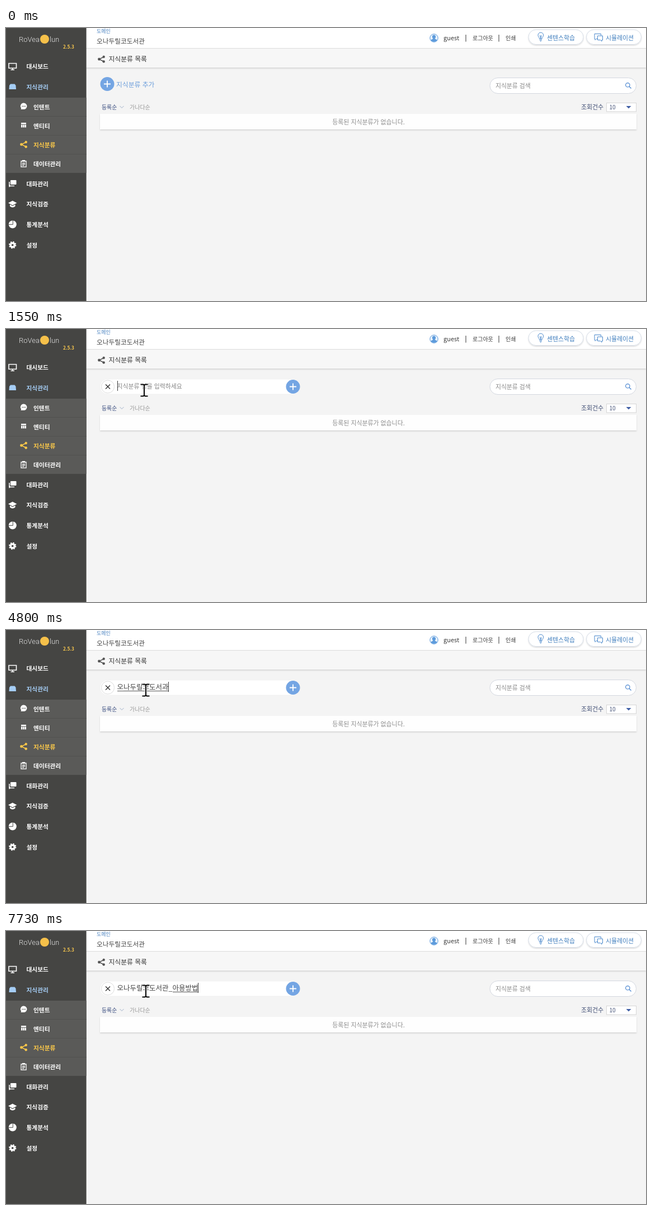
An HTML page for the animation above (8 s loop, 1144x490 px).

```html
<!DOCTYPE html>
<html lang="ko">
<head>
<meta charset="utf-8">
<title>지식분류 목록</title>
<style>
html, body { margin: 0; width: 100%; height: 100%; overflow: hidden; background: #f4f4f4; }
svg { display: block; width: 1144px; height: 490px; }
text { font-family: "Noto Sans CJK KR", "Noto Sans KR", "Noto Sans CJK JP", "Noto Sans CJK", sans-serif; white-space: pre; }
.brand { font: 300 13px Roboto, sans-serif; fill: #e4e4e4; }
.nav { font-size: 10.7px; font-weight: 700; fill: #fff; }
.lines { fill: none; stroke: currentColor; }
</style>
</head>
<body>
<svg viewBox="0 0 1144 490" xmlns="http://www.w3.org/2000/svg">
<defs>
  <filter id="shade" x="-10%" y="-30%" width="120%" height="180%">
    <feDropShadow dx="0" dy="1.5" stdDeviation="1.3" flood-color="#000" flood-opacity=".15"/>
  </filter>
  <g id="share" fill="currentColor">
    <path d="M5-4.5L-4 0L5 4.5" fill="none" stroke="currentColor" stroke-width="1.5"/>
    <circle cx="-4" r="2.4"/><circle cx="4.2" cy="-4.3" r="2.2"/><circle cx="4.2" cy="4.3" r="2.2"/>
  </g>
  <g id="plus">
    <circle r="12.5" fill="#74a5e3"/>
    <path d="M-6 0H6M0-6V6" stroke="#fff" stroke-width="1.8"/>
  </g>
  <path id="ibeam" d="M-6.5-10.5H-1.5L0-9L1.5-10.5H6.5M0-9.5V9.5M-6.5 10.5H-1.5L0 9L1.5 10.5H6.5"/>
  <clipPath id="fieldClip"><rect id="clipBox" x="168" y="88" height="32"/></clipPath>
</defs>

<rect width="1144" height="490" fill="#f4f4f4"/>
<rect x="143" y="37" width="1001" height="34" fill="#f7f7f7" filter="url(#shade)"/>
<rect x="143" width="1001" height="36" fill="#fff"/>
<path d="M143 36.5H1144" stroke="#dcdcdc"/>

<!-- sidebar -->
<rect width="143.6" height="490" fill="#454543"/>
<rect y="125" width="143.6" height="135" fill="#5a5a58"/>
<path d="M0 158.5H143.6M0 192.5H143.6M0 226.5H143.6" stroke="#51514f"/>
<text class="brand" x="23" y="24.5">RoVea</text>
<circle cx="69" cy="20" r="8" fill="#f5c04a"/>
<text class="brand" x="78" y="24.5">lun</text>
<text x="102" y="37" font-size="8.2" font-weight="700" fill="#fbc94d">2.5.3</text>
<g id="menu"></g>

<g color="#fff" fill="#fff">
  <path class="lines" d="M5 63.5H18.5V72H5ZM11.7 72V75M8.5 75H15" stroke-width="1.6"/>
  <path d="M6 103L8 100.5H15.5L17.5 103L18 110H5.5Z" fill="#a5cdf5"/>
  <path d="M31.5 134.5a6 5.8 0 1 1 0 11.6H26.5L27.3 144A6 5.8 0 0 1 31.5 134.5Z"/>
  <path d="M28.3 140.5h1.6m1 0h1.6m1 0h1.6" stroke="#5a5a58" stroke-width="1.5"/>
  <path d="M27 170h9v2.6h-9zM27 173.6h2.5v5h-2.5zM30.3 173.6h2.5v5h-2.5zM33.5 173.6h2.5v5h-2.5z"/>
  <use href="#share" x="31.5" y="209" color="#fcc84a"/>
  <path class="lines" d="M27 239H36V249.3H27ZM29 242.3H34M29 244.5H34M29 246.8H32.5" stroke-width="1.3"/>
  <path d="M29 237h5v2.5h-5z"/>
  <path d="M9 273h8.5q1 0 1 1v6q0 1-1 1h-8.5q-1 0-1-1v-6q0-1 1-1z"/>
  <path class="lines" d="M6 276V283.5H15" stroke-width="1.6"/><path d="M5.5 281v5l3-2.5z"/>
  <path d="M4 314L11.7 310L19.4 314L11.7 318.2ZM7 316.8L11.7 319.4L16.5 316.8V320Q11.7 324 7 320Z"/>
  <circle cx="11.8" cy="352.5" r="7"/>
  <path d="M12.3 345V352.7H5" fill="none" stroke="#454543"/>
  <circle cx="11.7" cy="389.5" r="3.6" fill="none" stroke="#fff" stroke-width="3.5"/>
  <circle cx="11.7" cy="389.5" r="5.7" fill="none" stroke="#fff" stroke-width="2" stroke-dasharray="2.24"/>
</g>

<!-- header -->
<text x="162" y="9" font-size="9" fill="#4a83c0">도메인</text>
<text x="162" y="28" font-size="11.7" fill="#444">오나두릴코도서관</text>
<circle cx="765" cy="18" r="7.2" fill="#eaf3fc" stroke="#5d9bdc"/>
<path d="M765 12.5c4.2 0 3.6 5 1.7 6.5c.2 1.2 3.3 1 3.8 3a7 7 0 0 1-11 0c.5-2 3.6-1.8 3.8-3c-1.9-1.5-2.5-6.5 1.7-6.5z" fill="#5d9bdc"/>
<g font-size="10" fill="#3c3c3c">
  <text x="782" y="21.5" font-size="11">guest</text>
  <text x="834" y="21.5">로그아웃</text>
  <text x="893" y="21.5">인쇄</text>
</g>
<path d="M822 12V24.5M881 12V24.5" stroke="#555" stroke-width="1.2"/>
<g fill="#fff" stroke="#d5dce6" filter="url(#shade)">
  <rect x="934" y="3" width="98" height="26.5" rx="13.25"/>
  <rect x="1037.5" y="3" width="98" height="26.5" rx="13.25"/>
</g>
<g class="lines" color="#4a88cc">
  <path d="M953.5 19.5C953.5 16.5 951 16 951 12.8a4.8 4.8 0 0 1 9.6 0C960.6 16 958 16.5 958 19.5ZM953.5 21.5H958M954.5 23.5H957M954.5 13L955.8 19L957 13"/>
  <path d="M1057 19.5H1055L1053 21.5V19.5H1052V10.5H1063.5V13.5M1057.5 14H1066.5V21.5H1065V24L1062.5 21.5H1057.5Z"/>
</g>
<g font-size="10.9" font-weight="500" fill="#3d7cbd">
  <text x="967" y="21.5">센텐스학습</text>
  <text x="1072" y="21.5">시뮬레이션</text>
</g>
<use href="#share" x="170.5" y="56" color="#555"/>
<text x="183.5" y="60" font-size="11.8" fill="#333">지식분류 목록</text>

<!-- list -->
<rect x="865" y="89.5" width="261.5" height="28" rx="14" fill="#fff" stroke="#d3d7df"/>
<text x="875" y="107.5" font-size="10.8" fill="#888">지식분류 검색</text>
<g class="lines" color="#4a86d0" stroke-width="1.2"><circle cx="1111.3" cy="102.3" r="3.7"/><path d="M1114 105L1117.5 108.5"/></g>
<text x="171" y="145.5" font-size="9.9" fill="#34487c">등록순</text>
<path class="lines" d="M203.5 140L207 143.5L210.5 140" color="#9dafc8"/>
<text x="221" y="145.5" font-size="10" fill="#999">가나다순</text>
<text x="1028" y="146" font-size="10.9" fill="#3f4d73">조회건수</text>
<rect x="1073.5" y="134.5" width="53" height="15.5" fill="#fff" stroke="#d6d6d6"/>
<text x="1078.5" y="146" font-size="10" fill="#3f4d73">10</text>
<path d="M1108.5 140H1117.5L1113 144.5Z" fill="#405fa5"/>
<rect x="168" y="154" width="959" height="28" fill="#fefefe" filter="url(#shade)"/>
<text x="648" y="172.5" font-size="10.9" fill="#8c8c8c" text-anchor="middle">등록된 지식분류가 없습니다.</text>

<!-- input -->
<rect id="field" x="168" y="90" height="27" rx="13.5" fill="#fff" stroke="#eee" stroke-width=".7"/>
<text id="hint" x="198.5" y="107" font-size="10.9" fill="#858585" clip-path="url(#fieldClip)">지식분류 명을 입력하세요</text>
<g id="close" transform="translate(182 103.5)">
  <circle r="11.5" fill="#fff" stroke="#dcdcdc"/>
  <path d="M-4-4L4 4M4-4L-4 4" stroke="#333" stroke-width="1.4"/>
</g>
<use id="add" href="#plus"/>
<text id="label" font-size="11.8" fill="#6c9edb">지식분류 추가</text>
<text id="typed" x="198.5" y="106.5" font-size="12.5" fill="#444"></text>
<path id="under" stroke="#555"/>
<path id="caret" stroke="#333"/>

<g id="arrow" fill="#fff" stroke="#000" stroke-width="1.2"><path d="M0 0V22L5 17.3L8.7 25.5L12.5 23.8L8.9 15.8H16Z"/></g>
<g id="hand" fill="#fff" stroke="#000" stroke-width="1.1" stroke-linejoin="round">
  <path d="M-2 2C-2-.8 2-.8 2 2V11C3 9 6.5 9.5 6.5 11.5C8 10 10.5 11 10.5 13C12 12 14 13 14 15V20C14 23 12 24 12 28H0C0 25-3 23-5 19L-7 15.5C-8 13-5 12-3.5 14L-2 16Z"/>
  <path d="M2 10V15M6.5 11.5V16M10.5 13V17" stroke-width=".9"/>
</g>
<g id="beam" fill="none">
  <use href="#ibeam" stroke="#fff" stroke-width="4"/>
  <use href="#ibeam" stroke="#000" stroke-width="2"/>
</g>
</svg>
<script>
const LOOP = 8000, LEFT = 198.5, OPEN = 940, FOCUS = 1348, TYPE = 2400;
const $ = id => document.getElementById(id);
const set = (id, attrs) => { for (const k in attrs) $(id).setAttribute(k, attrs[k]); };
const show = (id, on) => set(id, { visibility: on ? 'visible' : 'hidden' });
const mix = (a, b, p) => a + (b - a) * p;

// label, x, row centre, colour
const menu = [
  ['대시보드', 36.5, 69], ['지식관리', 36.5, 106, '#a5cdf5'], ['인텐트', 49, 141.5], ['엔티티', 49, 175.5],
  ['지식분류', 49, 209.5, '#fcc84a'], ['데이터관리', 49, 244], ['대화관리', 36.5, 279.5],
  ['지식검증', 36.5, 316], ['통계분석', 36.5, 353], ['설정', 36.5, 390]
];
$('menu').innerHTML = menu.map(([s, x, y, c = '#fff']) =>
  `<text class="nav" x="${x}" y="${y + 4}" style="fill:${c}">${s}</text>`).join('');

// each run: committed text, then time and composed text
const runs = [
  ['', [2400, 'ㅇ', 2490, '오', 2580, '온', 2670, '오나', 2760, '오낟', 2850, '오나두', 2940, '오나둘',
    3080, '오나두리', 3150, '오나두릴', 3350, '오나두릴ㅋ', 3480, '오나두릴코', 4280, '오나두릴콛',
    4380, '오나두릴코도', 4480, '오나두릴코돗', 4590, '오나두릴코도서', 4700, '오나두릴코도석',
    4800, '오나두릴코도서과', 4950, '오나두릴코도서관']],
  ['오나두릴코도서관_', [5660, '', 5930, 'ㅇ', 6130, '아', 6390, '앙', 6540, '아요', 6660, '아용',
    7270, '아용ㅂ', 7350, '아용바', 7460, '아용방ㅂ', 7580, '아용방버', 7730, '아용방법']]
];
const keys = runs.flatMap(([done, list]) => list.flatMap((v, i) =>
  i % 2 ? [] : [{ at: v, done, live: list[i + 1] }]));

function pointer(t) {
  if (t < OPEN) {
    const left = 1 - Math.min(1, Math.floor((t - 120) / 68) / 10);
    return [mix(182, 732, left ** 1.84), mix(102, 390, left ** 2.4)];
  }
  const q = OPEN + Math.floor((t - OPEN) / 68) * 68;
  if (q < 1280) {
    const p = (q - OPEN) / 340;
    return [mix(182, 244, p), mix(102, 112, p)];
  }
  const p = Math.min(1, (q - 1280) / 408);
  return [mix(244, 250, p), mix(112, 108, p)];
}

function drawField(t) {
  const opened = t >= OPEN, focused = t >= FOCUS;
  const steps = opened ? Math.min(1, (Math.floor((t - OPEN) / 68) + 1) / 4) : 0;
  const e = 1 - (1 - steps) ** 2;
  const width = focused ? 358 : mix(26, 345, e);
  set('field', { width });
  set('clipBox', { width });
  show('field', opened);
  show('hint', opened && t < TYPE);
  show('close', focused);
  show('label', !focused);
  set('label', { x: mix(197, 517, e), y: opened ? 108.5 : 105.5 });
  set('add', { x: focused ? 513 : 181, y: opened ? 103.5 : 100.5 });
}

function drawText(t) {
  const key = keys.filter(k => k.at <= t).pop() || { at: FOCUS, done: '', live: '' };
  const typed = $('typed');
  typed.textContent = key.done;
  const from = LEFT + (key.done ? typed.getComputedTextLength() : 0);
  typed.textContent = key.done + key.live;
  const end = LEFT + (typed.textContent ? typed.getComputedTextLength() : 0);
  set('under', { d: key.live ? `M${from + .5} 109.5H${end}` : '' });
  const x = Math.floor(end) + .5 + (t < TYPE ? 1 : 0);
  set('caret', { d: `M${x} 93V111` });
  show('caret', t >= FOCUS && t - key.at < (t < TYPE ? 542 : 510));
}

function drawPointer(t) {
  const [x, y] = pointer(t);
  const kind = t < 120 ? '' : t >= 1008 ? 'beam' : x < 265 && y < 116 ? 'hand' : 'arrow';
  for (const id of ['arrow', 'hand', 'beam']) show(id, id === kind);
  if (kind) set(kind, { transform: `translate(${x} ${y})` });
}

function draw() {
  const t = performance.now() % LOOP;
  drawField(t);
  drawText(t);
  drawPointer(t);
  requestAnimationFrame(draw);
}
draw();
</script>
</body>
</html>
```
